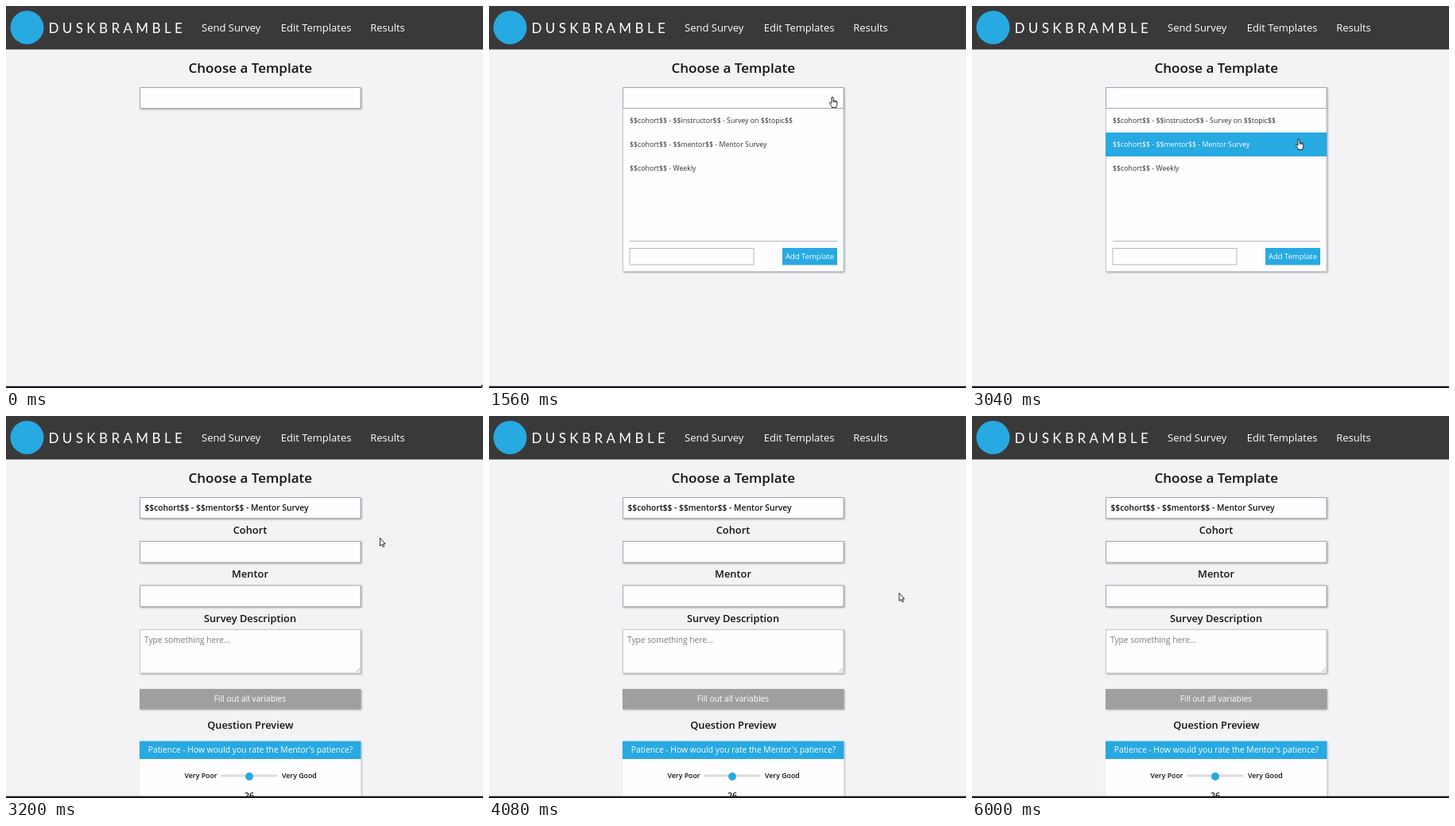
Animation of 600x480 px, one loop 6.04 s. Source, as an HTML page:

```html
<!DOCTYPE html>
<html lang="en">
<head>
<meta charset="utf-8">
<title>Survey templates</title>
<style>
  html, body { margin: 0; width: 600px; height: 480px; overflow: hidden; background: #f3f2f5; }
  svg { display: block; font-family: "Open Sans", "Noto Sans", sans-serif; }
  text { fill: #141414; white-space: pre; }
  .semi { font-weight: 600; }
  .mid { text-anchor: middle; }
  .light { fill: #fff; }
  .nav { font-size: 13px; font-weight: 500; fill: #fff; }
  .brand { font: 400 17px Lato, sans-serif; letter-spacing: 4.4px; fill: #fff; }
  .title { font-size: 17.05px; }
  .label { font-size: 12.85px; }
  .body { font-size: 10.2px; }
  .item { font-size: 8.8px; fill: #333; }
  .scale { font-size: 8.8px; }
  .hint { fill: #7b7a7d; }
  .blue { fill: #27a9e1; }
  .box { fill: #fefdff; stroke: #a9a6b2; filter: drop-shadow(1px 1px 1px #0005); }
  .soft { stroke: #cbc8d0; }
  .field { fill: #fefdff; stroke: #b7b5bb; }
</style>
</head>
<body>
<svg id="stage" width="600" height="480" viewBox="0 0 600 480">
  <rect width="600" height="480" fill="#f3f2f5"/>
  <rect width="600" height="54.6" fill="#3a393a"/>
  <circle class="blue" cx="26.5" cy="27" r="21"/>
  <text class="brand" x="53.5" y="33.8">DUSKBRAMBLE</text>
  <text class="nav" x="246" y="31.5">Send Survey</text>
  <text class="nav" x="345.7" y="31.5">Edit Templates</text>
  <text class="nav" x="458.2" y="31.5">Results</text>
  <text class="title semi mid" x="307.3" y="84">Choose a Template</text>

  <g id="closed">
    <rect class="box" x="168.5" y="102.5" width="277.5" height="26"/>
  </g>

  <g id="list">
    <rect class="box soft" x="168.5" y="102.5" width="277.5" height="231"/>
    <rect class="field" x="168.5" y="102.5" width="277.5" height="26" style="stroke:#a9a6b2"/>
    <g id="rows"></g>
    <path d="M177 295.5H438" stroke="#b7b5bb"/>
    <rect class="field" x="177" y="304.5" width="156" height="20.5"/>
    <rect class="blue" x="369" y="304" width="69" height="21.5"/>
    <text class="light mid" x="403.5" y="318.3" font-size="9.5">Add Template</text>
  </g>

  <g id="form">
    <rect class="box" x="168.5" y="102.5" width="277.5" height="26"/>
    <text class="semi" x="174.5" y="118.8" font-size="10.25">$$cohort$$ - $$mentor$$ - Mentor Survey</text>
    <text class="label semi mid" x="307" y="147.8">Cohort</text>
    <rect class="box" x="168.5" y="157.5" width="277.5" height="26.5"/>
    <text class="label semi mid" x="307" y="203.3">Mentor</text>
    <rect class="box" x="168.5" y="213" width="277.5" height="26.5"/>
    <text class="label semi mid" x="307" y="258.8">Survey Description</text>
    <rect class="box soft" x="168.5" y="268.5" width="277.5" height="54.5"/>
    <path d="M440.5 321.5L445 317M443 321.5L445 319.5" stroke="#999" stroke-width=".7"/>
    <text class="body hint" x="174" y="285">Type something here...</text>
    <rect x="168" y="343" width="278.5" height="25.5" fill="#a09ea0" style="filter:drop-shadow(1px 1px 1px #0004)"/>
    <text class="body light mid" x="307" y="359.2">Fill out all variables</text>
    <text class="label semi mid" x="307.3" y="392.8">Question Preview</text>
    <rect x="168" y="408.5" width="278.5" height="90" fill="#fefdff" style="filter:drop-shadow(1px 1px 1px #0004)"/>
    <rect class="blue" x="168" y="408.5" width="278.5" height="22.5"/>
    <text class="light mid" x="307.5" y="423" font-size="10.3">Patience - How would you rate the Mentor's patience?</text>
    <text class="scale semi" x="224.5" y="454.8">Very Poor</text>
    <text class="scale semi" x="347" y="454.8">Very Good</text>
    <rect x="270" y="450.5" width="71.5" height="3" rx="1.5" fill="#dbdadd"/>
    <circle class="blue" cx="306" cy="453" r="5"/>
    <text class="semi mid" x="306" y="480.5" font-size="10.6">26</text>
  </g>

  <rect y="477.7" width="600" height="2.3" fill="#17131a"/>

  <g id="cursor" fill="#fff" stroke="#111" stroke-width=".9" stroke-linejoin="round">
    <path id="arrow" d="M0 0V9.8L2.2 7.9L3.7 11.2L5.3 10.5L3.9 7.3H6.6Z"/>
    <path id="hand" d="M-1.1 1Q0-.6 1.1 1V4.6L4.8 5.5Q6.2 6 6 7.8Q6 10.5 4.8 12V13.6H-.8V12.2L-3.6 8.4Q-3.6 6.8-2.2 7.4L-1.1 8.4ZM1.1 4.6V7M3 5.2V7.2M4.7 5.6V7.4"/>
  </g>
</svg>
<script>
  const LOOP = 6040, OPEN = 1480, PICK = 3120, GONE = 4760;
  const ROW_TOP = 129, ROW_H = 30;
  const ITEMS = [
    "$$cohort$$ - $$instructor$$ - Survey on $$topic$$",
    "$$cohort$$ - $$mentor$$ - Mentor Survey",
    "$$cohort$$ - Weekly"
  ];
  // Pointer stops: time, x, y
  const PATH = [
    [0, 598.5, 476], [40, 597, 474], [600, 503.5, 275.8], [760, 503.5, 275.8],
    [1240, 432, 114], [2000, 432, 114], [2300, 428.7, 128], [2400, 428.7, 128],
    [2700, 411, 167], [3080, 411, 167], [3240, 481, 151], [3280, 491, 149.5],
    [3640, 516, 222.5], [4240, 516, 222.5], [GONE, 602, 474], [LOOP, 602, 474]
  ];

  const $ = id => document.getElementById(id);
  const show = (id, on) => $(id).setAttribute("display", on ? "inline" : "none");

  function add(tag, attrs, text = "") {
    const el = document.createElementNS("http://www.w3.org/2000/svg", tag);
    for (const key in attrs) el.setAttribute(key, attrs[key]);
    el.textContent = text;
    return $("rows").appendChild(el);
  }

  const rows = ITEMS.map((text, i) => {
    const y = ROW_TOP + i * ROW_H;
    return {
      back: add("rect", { class: "blue", x: 168, y, width: 278.5, height: ROW_H }),
      label: add("text", { class: "item", x: 177, y: y + 17.8 }, text)
    };
  });

  function pointerAt(t) {
    const i = PATH.findIndex(stop => stop[0] > t);
    const [t0, x0, y0] = PATH[i - 1], [t1, x1, y1] = PATH[i];
    const p = (t - t0) / (t1 - t0), e = p * p * (3 - 2 * p);
    return [x0 + (x1 - x0) * e, y0 + (y1 - y0) * e];
  }

  function draw(t) {
    const open = t >= OPEN && t < PICK;
    const [x, y] = pointerAt(t);
    show("closed", t < OPEN);
    show("list", open);
    show("form", t >= PICK);

    const hover = open ? Math.floor((y - ROW_TOP) / ROW_H) : -1;
    rows.forEach(({ back, label }, i) => {
      back.setAttribute("opacity", i === hover ? 1 : 0);
      label.style.fill = i === hover ? "#fff" : "";
    });

    const overBox = x > 168 && x < 446 && y > 102 && y < 129;
    const hand = t < PICK && (overBox || hover >= 0 && x < 446);
    show("arrow", !hand);
    show("hand", hand);
    show("cursor", t < GONE);
    $("cursor").setAttribute("transform", `translate(${x} ${y})`);
  }

  const start = performance.now();
  function tick() {
    draw((performance.now() - start) % LOOP);
    requestAnimationFrame(tick);
  }
  tick();
</script>
</body>
</html>
```
